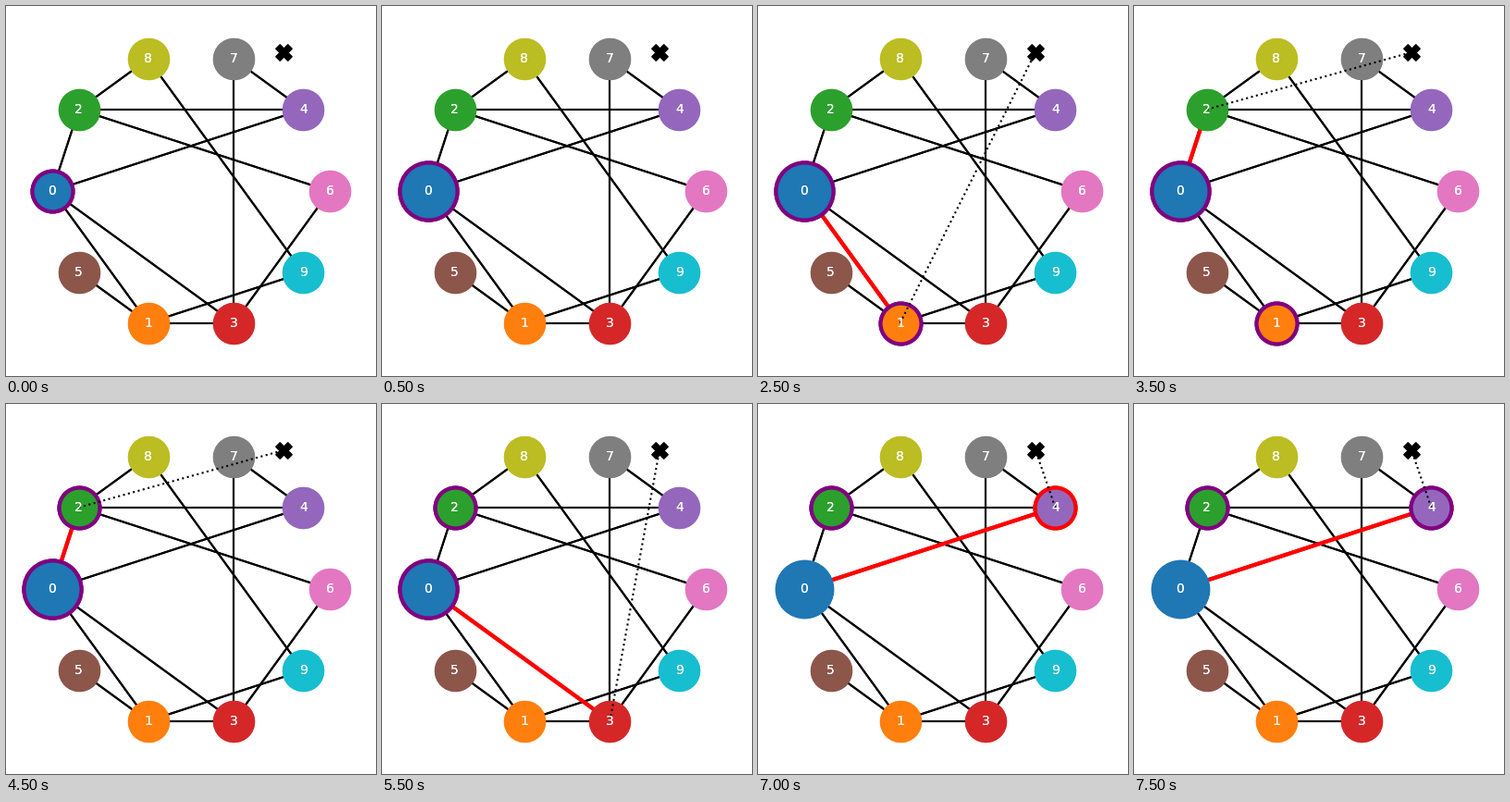
A matplotlib script that plays this animation: 400 px wide and 400 px high, repeating every 8000 ms.

```python
import numpy as np
import matplotlib.pyplot as plt
from matplotlib.animation import FuncAnimation

SIZE, DPI = 400, 100
STEP_MS = 500
START, KEEP = 0, 2
QUERY = (300, 350)

RING = [6, 4, 7, 8, 2, 0, 5, 1, 3, 9]  # counter-clockwise from the right
LINKS = {0: (1, 2, 3, 4), 1: (3, 5, 9), 2: (4, 6, 8), 3: (6, 7), 4: (7,), 8: (9,)}

pos = {}
for k, node in enumerate(RING):
    a = 2 * np.pi * k / len(RING)
    pos[node] = (200 + 150 * np.cos(a), 200 + 150 * np.sin(a))


def dist(node):
    return np.hypot(*np.subtract(pos[node], QUERY))


def search():
    """Yield (expanded, active neighbour, probing, borders) for each step."""
    best = [START]

    def borders(fresh=None):
        return {n: "red" if n == fresh else "purple" for n in best}

    yield False, None, False, borders()
    yield True, None, False, borders()
    for n in LINKS[START]:
        yield True, n, False, borders()
        yield True, n, True, borders()
        if len(best) < KEEP or dist(n) < max(map(dist, best)):
            best = sorted(best + [n], key=dist)[:KEEP]
            yield True, n, True, borders(fresh=n)
            yield True, n, True, borders()


steps = list(search())

fig = plt.figure(figsize=(SIZE / DPI, SIZE / DPI), dpi=DPI, facecolor="white")
ax = fig.add_axes([0, 0, 1, 1])
ax.set(xlim=(0, SIZE), ylim=(0, SIZE))
ax.axis("off")


def segment(p, q, **style):
    return ax.plot(*zip(p, q), color="black", lw=1.5, **style)[0]


# Everything solid is inked twice, which firms up the antialiased rims
lines, dots = [], []
for _ in range(2):
    lines += [((u, v), segment(pos[u], pos[v], zorder=1))
              for u, ends in LINKS.items() for v in ends]
    for node, xy in pos.items():
        dots.append((node, ax.scatter(*xy, s=1000, color=f"C{node}", zorder=3)))
        ax.text(*xy, str(node), color="white", size=10,
                ha="center", va="center", zorder=5)
    ax.scatter(*QUERY, s=150, marker="X", color="black", lw=1, zorder=6)
probe = segment(pos[START], QUERY, ls=":", zorder=4)


def update(i):
    expanded, active, probing, borders = steps[i]

    for edge, line in lines:
        hot = edge == (START, active)
        line.set(color="red" if hot else "black", linewidth=3 if hot else 1.5,
                 zorder=2 if hot else 1)

    for node, dot in dots:
        dot.set_edgecolor(borders.get(node, f"C{node}"))
        dot.set_linewidth(3 if node in borders else 1)
        dot.set_sizes([2000 if expanded and node == START else 1000])

    probe.set_visible(probing)
    if probing:
        probe.set_data(*zip(pos[active], QUERY))


anim = FuncAnimation(fig, update, frames=len(steps), interval=STEP_MS,
                     repeat=True, repeat_delay=0, blit=False)
plt.show()
```
